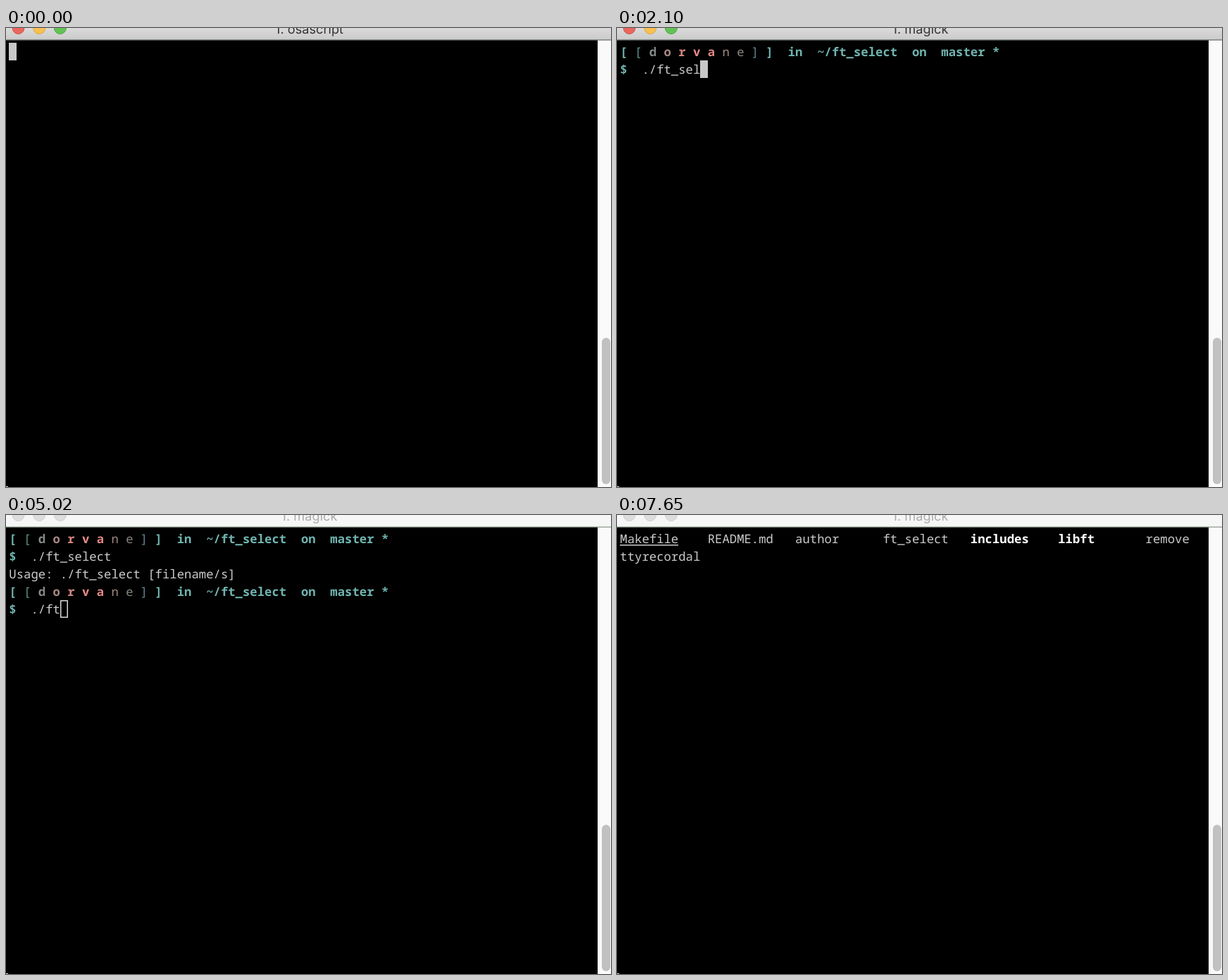
Recreate the animation shown at these times as an HTML page with a canvas. Size 859 px wide and 652 px high, loop 8 s.

```html
<!DOCTYPE html>
<html lang="en">
<head>
<meta charset="utf-8">
<title>Terminal session</title>
<style>
  html, body { margin: 0; height: 100%; overflow: hidden; background: #000; }
  canvas { display: block; }
</style>
</head>
<body>
<canvas id="stage" width="859" height="652"></canvas>
<script>
const ctx = document.getElementById('stage').getContext('2d');
ctx.textRendering = 'geometricPrecision';

const LOOP = 8000;
const CELL = 10.365, LINE = 25, LEFT = 4.3, TOP = 21;
const TEAL = '#70b4b0', GRAY = '#cbcbcb';
const COMMAND = './ft_select *';

// Times at which each character of the command appears.
const FIRST_KEYS = [1060, 1220, 1410, 1660, 1760, 1940, 2020, 2100, 2330, 2410, 2980];
const SECOND_KEYS = [4360, 4620, 4740, 5020, 5080, 5270, 5360, 5450, 5660, 5760, 6980, 7210, 7550];
const PROMPT_AT = 980, TITLE_AT = 1410, ENTER_AT = 3080, USAGE_AT = 3260,
      SECOND_PROMPT_AT = 4270, LIST_AT = 7650;

const USER = [...'[dorvane]'];
const USER_COLORS = ['#5f918a', '#848a88', '#a98983', '#d58580', '#ea8e8a',
                     '#df8885', '#a08883', '#8a8580', '#5f8592'];
const FILES = ['Makefile', 'README.md', 'author', 'ft_select', 'includes', 'libft', 'remove', 'ttyrecordal'];
const FOLDERS = ['includes', 'libft'];

function rect(x, y, w, h, color) {
  ctx.fillStyle = color;
  ctx.fillRect(x, y, w, h);
}

function write(text, col, row, color = GRAY, weight = 400) {
  ctx.font = `${weight} 17.27px "Noto Sans Mono", "DejaVu Sans Mono", monospace`;
  ctx.textAlign = 'left';
  ctx.fillStyle = color;
  [...text].forEach((char, i) =>
    ctx.fillText(char, LEFT + (col + i) * CELL, TOP + row * LINE + 19));
}

function cursor(col, row, hollow) {
  const x = Math.round(4 + col * CELL), y = TOP + row * LINE;
  if (!hollow) return rect(x, y, 11, LINE, '#c7c7c7');
  ctx.strokeStyle = '#d8d8d8';
  ctx.lineWidth = 1.5;
  ctx.strokeRect(x + 0.75, y + 0.75, 9.5, LINE - 1.5);
}

function prompt(row) {
  write('[', 0, row, TEAL, 700);
  USER.forEach((char, i) => write(char, 2 + 2 * i, row, USER_COLORS[i], i > 0 && i < 6 ? 700 : 500));
  write(']  in  ~/ft_select  on  master *', 20, row, TEAL, 700);
}

function commandLine(t, row, keys, hollow, showCursor) {
  const count = keys.filter(time => t >= time).length;
  write('$', 0, row, TEAL, 700);
  write(COMMAND.slice(0, count), 3, row);
  if (showCursor) cursor(3 + count, row, hollow);
}

function session(t) {
  if (t < PROMPT_AT) return cursor(0, 0);
  prompt(0);
  commandLine(t, 1, FIRST_KEYS, false, t < ENTER_AT);
  if (t < ENTER_AT) return;
  if (t < USAGE_AT) return cursor(0, 2);
  write('Usage: ./ft_select [filename/s]', 0, 2);
  prompt(3);
  if (t < SECOND_PROMPT_AT) cursor(0, 4, true);
  else commandLine(t, 4, SECOND_KEYS, true, true);
}

function fileList() {
  FILES.forEach((name, i) => {
    const folder = FOLDERS.includes(name);
    write(name, i % 7 * 12, Math.floor(i / 7), folder ? '#fff' : GRAY, folder ? 700 : 400);
  });
  rect(4, 42, 83, 1.5, GRAY);
}

function titleBar(t) {
  const active = t < USAGE_AT;
  const shade = ctx.createLinearGradient(0, 0, 0, 16);
  shade.addColorStop(0, active ? '#dadada' : '#f6f6f6');
  shade.addColorStop(1, active ? '#cbcbcb' : '#f6f6f6');
  rect(0, 0, 859, 16, shade);
  rect(0, 16, 859, 1.5, active ? '#8b938c' : '#bccabd');

  const lights = active
    ? [['#e9675d', '#cf554c'], ['#f6c150', '#dda63c'], ['#62c254', '#4da641']]
    : Array(3).fill(['#dddddd', '#d0d0d0']);
  lights.forEach(([fill, edge], i) => {
    ctx.beginPath();
    ctx.arc(17.5 + i * 29.7, 0, 8.5, 0, 2 * Math.PI);
    ctx.fillStyle = fill;
    ctx.fill();
    ctx.strokeStyle = edge;
    ctx.lineWidth = 1;
    ctx.stroke();
  });

  ctx.font = '400 18.2px Inter, Roboto, sans-serif';
  ctx.textAlign = 'center';
  ctx.fillStyle = active ? '#353535' : '#ababab';
  ctx.fillText(t < TITLE_AT ? '1. osascript' : '1. magick', 430.5, 7.5);
}

function scrollBar() {
  rect(840, 17.5, 19, 634.5, '#fafafa');
  ctx.fillStyle = '#c1c1c1';
  ctx.beginPath();
  ctx.roundRect(846, 440, 12, 208, 6);
  ctx.fill();
}

function draw(t) {
  rect(0, 0, 859, 652, '#000');
  if (t < LIST_AT) session(t);
  else fileList();
  titleBar(t);
  scrollBar();
  rect(0, 651, 3, 1, '#ddd');
}

const start = performance.now();
function tick() {
  draw((performance.now() - start) % LOOP);
  requestAnimationFrame(tick);
}
tick();
</script>
</body>
</html>
```
